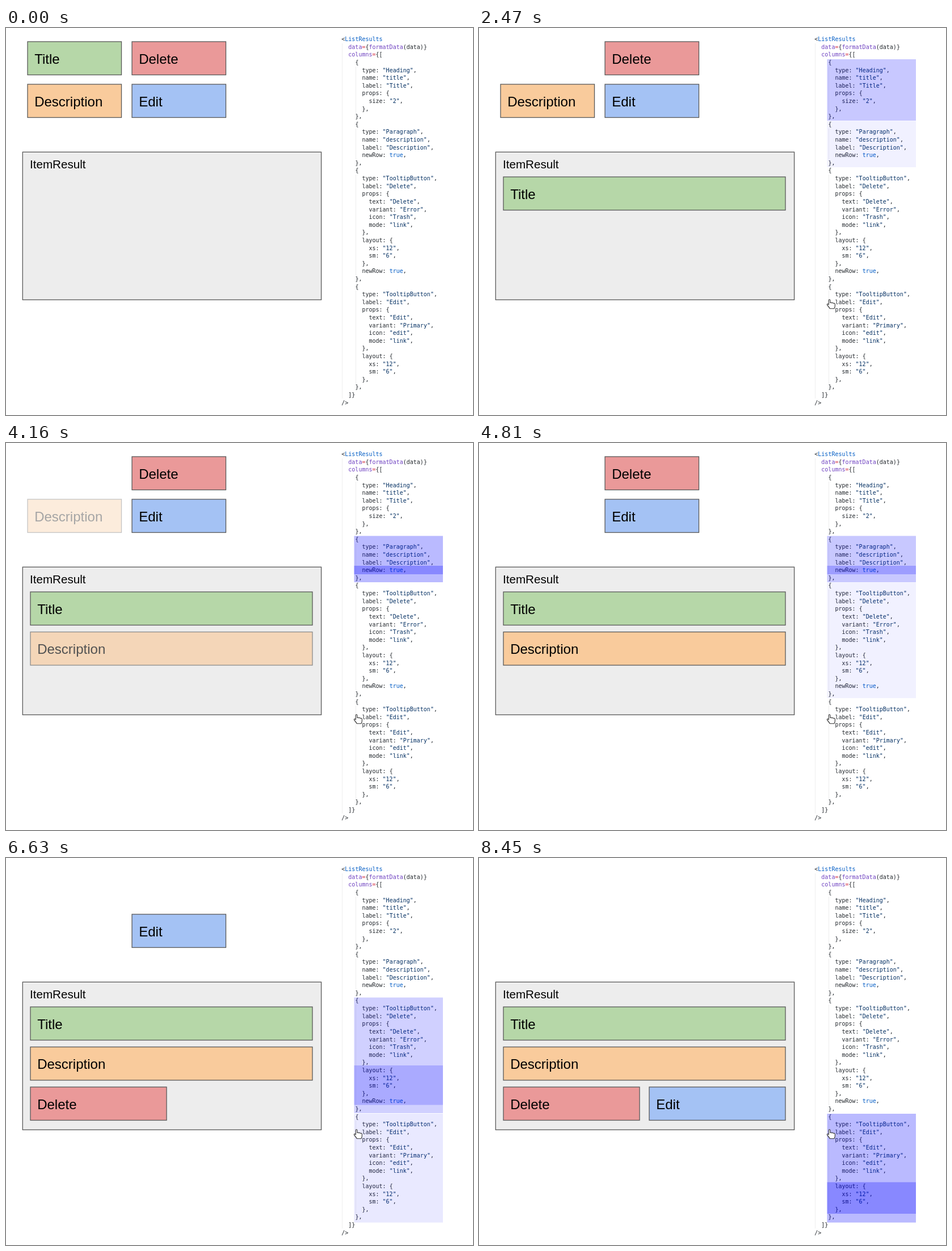
These frames come from a looping animation (823 by 681 pixels, 8840 ms). An HTML page:

```html
<!DOCTYPE html>
<html lang="en">
<head>
<meta charset="utf-8">
<title>ListResults layout</title>
<style>
  html, body { margin: 0; width: 100%; height: 100%; overflow: hidden; background: #fff; }
  svg { display: block; width: 823px; height: 681px; }
  .card rect { stroke: #595959; stroke-width: 1.3; }
  .card text { font: 24px "Liberation Sans", Arial, sans-serif; }
  .card .small { font-size: 20.6px; }
  .code { font: 10px "DejaVu Sans Mono", monospace; fill: #24292e; white-space: pre; }
  .tag, .bool { fill: #005cc5; }
  .attr { fill: #6f42c1; }
  .eq { fill: #d73a49; }
  .str { fill: #032f62; }
  .mark { fill: #00f; fill-opacity: .27; }
  .guide { stroke: #eee; }
</style>
</head>
<body>
<svg id="stage" viewBox="0 0 823 681">
  <g id="cards"></g>
  <path class="guide" d="M592.5 27V652M616.5 68V150M616.5 177V231M616.5 258V435M616.5 462V626"/>
  <g id="code"></g>
  <g id="marks"></g>
  <path id="hand" fill="#fff" stroke="#333" stroke-width="1.1" stroke-linejoin="round"
    d="M616.3 487V479.2Q616.3 477.8 617.6 477.8T618.9 479.2V483.6Q620.3 482.2 621.7 483.9Q623.2 482.7 624.5 484.4Q627.4 483.6 627.4 486.5V489Q627.4 491.5 625.9 493.8H618.3Q616.8 491 614 488Q612.8 486 614.2 485.5Q615.4 485.4 616.3 487Z"/>
</svg>
<script>
const source = `<ListResults
  data={formatData(data)}
  columns={[
    {
      type: "Heading",
      name: "title",
      label: "Title",
      props: {
        size: "2",
      },
    },
    {
      type: "Paragraph",
      name: "description",
      label: "Description",
      newRow: true,
    },
    {
      type: "TooltipButton",
      label: "Delete",
      props: {
        text: "Delete",
        variant: "Error",
        icon: "Trash",
        mode: "link",
      },
      layout: {
        xs: "12",
        sm: "6",
      },
      newRow: true,
    },
    {
      type: "TooltipButton",
      label: "Edit",
      props: {
        text: "Edit",
        variant: "Primary",
        icon: "edit",
        mode: "link",
      },
      layout: {
        xs: "12",
        sm: "6",
      },
    },
  ]}
/>`;

const LOOP = 8840, TICK = 130, FADE = 390, SLOW_FROM = 7410;
const $ = id => document.getElementById(id);

function add(parent, name, attrs, text = "") {
  const el = document.createElementNS("http://www.w3.org/2000/svg", name);
  for (const key in attrs) el.setAttribute(key, attrs[key]);
  el.textContent = text;
  return parent.appendChild(el);
}

// Code listing with simple syntax colours
const token = /"[^"]*"|ListResults|formatData|^data|^columns|=|true|[^"=]/g;
function kind(word) {
  if (word[0] === '"') return "str";
  if (word === "ListResults") return "tag";
  if (word === "true") return "bool";
  if (word === "=") return "eq";
  return word.length > 1 ? "attr" : "";
}
source.split("\n").forEach((line, i) => {
  const body = line.trimStart(), indent = line.length - body.length;
  const row = add($("code"), "text", { class: "code", x: 591.3 + indent * 6.02, y: 23.2 + i * 13.605 });
  for (const word of body.match(token)) add(row, "tspan", { class: kind(word) }, word);
});

// Cards
function card(label, fill, x, y, w, h = 58.5) {
  const g = add($("cards"), "g", { class: "card" });
  add(g, "rect", { x, y, width: w, height: h, fill });
  add(g, "text", { x: x + 12.2, y: y + 38.5 }, label);
  return g;
}
const panel = card("ItemResult", "#ededed", 29.3, 218.3, 526.3, 260);
const panelText = panel.querySelector("text");
panelText.setAttribute("class", "small");
panelText.setAttribute("x", 42);
panelText.setAttribute("y", 246.8);

// Each card fades out above and in inside the panel
const moves = [
  ["Title", "#b6d7a8", 38, 24, 43, 262, 497, 1690],
  ["Description", "#f9cb9c", 38, 99, 43, 332.5, 497, 3906],
  ["Delete", "#ea9999", 222, 24, 43, 403, 240, 5900],
  ["Edit", "#a4c2f4", 222, 99, 300, 403, 240, 7670, 780]
].map(([label, fill, x, y, toX, toY, w, start, span]) => ({
  start, span,
  from: card(label, fill, x, y, 165.5),
  to: card(label, fill, toX, toY, w)
}));

// Highlights: top, bottom, fade-in start, fade-out start, fade-in length
const marks = [
  [55, 163, 700, 2390],
  [163.5, 245, 2390, 4730],
  [216, 231, 3770, 4730],
  [245.5, 449, 4730, 6505],
  [365, 434.5, 5200, 6505],
  [450, 641.5, 6505, Infinity],
  [570.5, 626, 7150, Infinity, 520]
].map(([top, bottom, start, end, span]) => ({
  start, end, span,
  el: add($("marks"), "rect", { class: "mark", x: 613.5, y: top, width: 156.5, height: bottom - top })
}));

const ramp = (t, start, span = FADE) => Math.max(0, Math.min(1, (t - start) / span));

function draw(now) {
  let t = now % LOOP;
  t = t < SLOW_FROM
    ? Math.floor(t / TICK) * TICK
    : SLOW_FROM + Math.floor((t - SLOW_FROM) / (2 * TICK)) * 2 * TICK;
  for (const m of moves) {
    const p = ramp(t, m.start, m.span);
    m.from.style.opacity = 1 - p;
    m.to.style.opacity = p;
  }
  for (const m of marks) m.el.style.opacity = ramp(t, m.start, m.span) - ramp(t, m.end);
  $("hand").style.opacity = t >= 780 ? 1 : 0;
}

const began = performance.now();
function loop() {
  draw(performance.now() - began);
  requestAnimationFrame(loop);
}
loop();
</script>
</body>
</html>
```
